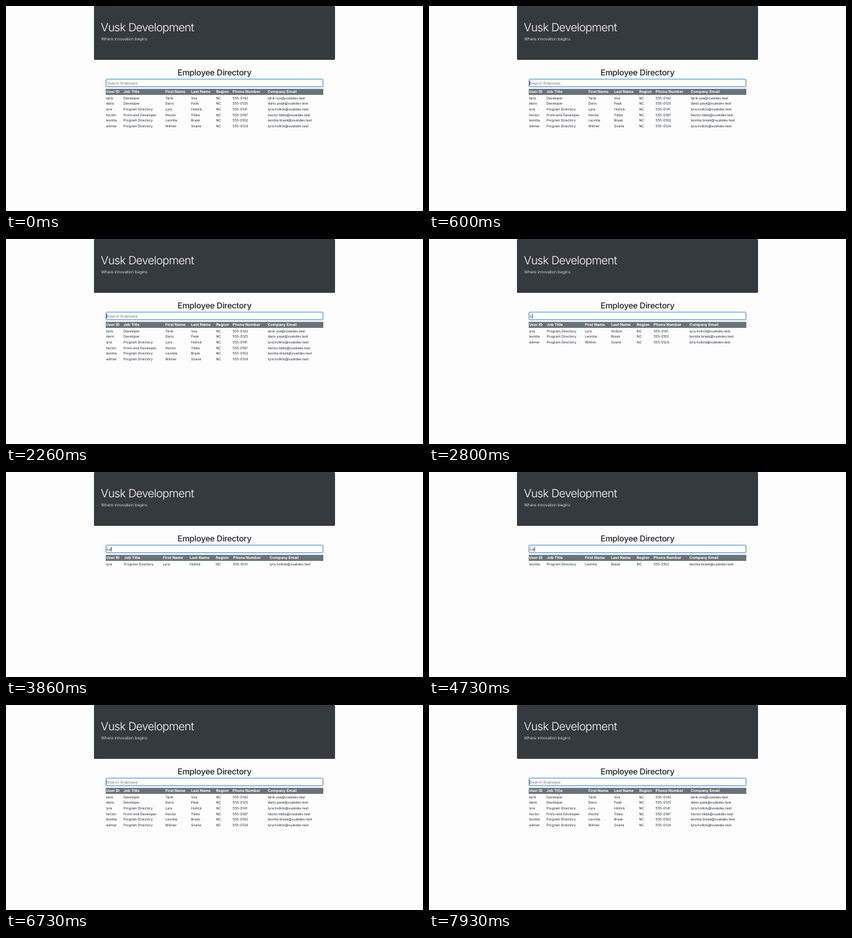
Animation, 640 px wide and 316 px high, one loop 8000 ms. Source, as an HTML page:

```html
<!DOCTYPE html>
<html lang="en">
<head>
<meta charset="utf-8">
<title>Employee Directory</title>
<style>
  html, body { margin: 0; width: 100%; height: 100%; overflow: hidden; background: #fdfdfd; }
  svg { display: block; width: 100%; height: 100%; }
  text {
    font-family: Inter, "Open Sans", sans-serif;
    font-optical-sizing: none;
    text-rendering: geometricPrecision;
    white-space: pre;
    fill: #212529;
  }
  .title { font-size: 17.4px; font-weight: 300; letter-spacing: -.034em; fill: #fff; }
  .lead { font-size: 6.3px; font-weight: 300; letter-spacing: -.012em; fill: #fff; }
  .heading { font-size: 12.6px; font-weight: 500; letter-spacing: -.02em; text-anchor: middle; }
  .search { font-size: 5.7px; }
  .hint { fill: #757575; }
  .head { font-size: 5.85px; font-weight: 700; fill: #fff; }
  .cell { font-size: 5.22px; }
</style>
</head>
<body>
<svg viewBox="0 0 640 316" xmlns="http://www.w3.org/2000/svg">
  <defs>
    <path id="beam" d="M-1.4-3.9Q0-3.9 0-2.9V2.9Q0 3.9-1.4 3.9M1.4-3.9Q0-3.9 0-2.9V2.9Q0 3.9 1.4 3.9"/>
  </defs>
  <rect width="640" height="316" fill="#fdfdfd"/>
  <rect x="135" width="370" height="83" rx="1.6" fill="#343a3e"/>
  <text class="title" x="145.6" y="39">Vusk Development</text>
  <text class="lead" x="146" y="53.3">Where innovation begins</text>
  <text class="heading" x="320" y="106.9">Employee Directory</text>
  <rect x="153.5" y="112.8" width="333" height="11.7" rx=".8" fill="#fff" stroke="#4288cc"/>
  <text class="search hint" id="hint" x="155" y="120.9">Search Employee</text>
  <text class="search" id="typed" x="155" y="120.9"></text>
  <rect id="caret" y="115.4" width=".8" height="7.2" fill="#1c1c1c"/>
  <rect x="153" y="127.7" width="334" height="9.3" fill="#69737a"/>
  <g id="table"></g>
  <g id="pointer" fill="none">
    <use href="#beam" stroke="#fff" stroke-width="1.3"/>
    <use href="#beam" stroke="#333" stroke-width=".5"/>
  </g>
</svg>
<script>
const LOOP = 8000;
const HALF_BLINK = 530;
const TABLE = { left: 153.2, width: 333.5, pad: .33, headY: 134.4, rowY: 143.5, pitch: 8.7 };
const $ = id => document.getElementById(id);
const clamp = v => Math.max(0, Math.min(1, v));

const heads = ['User ID', 'Job Title', 'First Name', 'Last Name', 'Region', 'Phone Number', 'Company Email'];

const person = (first, last, job, phone, mail = first + '.' + last) => [
  first.toLowerCase(), job, first, last, 'NC', '555-' + phone, mail.toLowerCase() + '@vuskdev.test'
];
const people = [
  person('Tarik', 'Voe', 'Developer', '0142'),
  person('Dario', 'Pask', 'Developer', '0125'),
  person('Lyra', 'Hollick', 'Program Directory', '0141'),
  person('Hector', 'Tibbs', 'Front-end Developer', '0197'),
  person('Leontia', 'Brask', 'Program Directory', '0102'),
  person('Wilmer', 'Soane', 'Program Directory', '0124', 'Lyra.Hollick')
];

// [time, query]; the first edit precedes the loop
const edits = [
  [-730, ''], [1000, 'D'], [2000, ''], [2800, 'L'], [3800, 'Ly'],
  [4330, 'L'], [4730, 'Le'], [5400, 'L'], [5670, '']
];

function addText(text, y, cls) {
  const el = document.createElementNS('http://www.w3.org/2000/svg', 'text');
  el.setAttribute('class', cls);
  el.setAttribute('y', y);
  el.textContent = text;
  $('table').append(el);
  return el;
}

// Columns share the table width in proportion to their widest text.
function layTable(rows) {
  $('table').replaceChildren();
  const columns = heads.map((head, c) => [
    addText(head, TABLE.headY, 'head'),
    ...rows.map((row, r) => addText(row[c], TABLE.rowY + r * TABLE.pitch, 'cell'))
  ]);
  const widths = columns.map(col =>
    Math.max(...col.map(el => el.getComputedTextLength())) + 2 * TABLE.pad);
  const scale = TABLE.width / widths.reduce((a, b) => a + b);
  let x = TABLE.left;
  columns.forEach((col, c) => {
    col.forEach(el => el.setAttribute('x', x + TABLE.pad));
    x += widths[c] * scale;
  });
}

let shown = null;
function showQuery(query) {
  if (query === shown) return;
  shown = query;
  $('typed').textContent = query;
  $('hint').style.display = query ? 'none' : '';
  layTable(people.filter(row => row[2].toLowerCase().includes(query.toLowerCase())));
}

// The caret is solid after each edit, then blinks with soft fades.
function showCaret(age) {
  const phase = Math.floor(age / HALF_BLINK);
  const p = age % HALF_BLINK;
  const fadeIn = phase ? clamp(.5 + p / 540) : 1;
  const fadeOut = clamp((HALF_BLINK - p) / 70);
  const width = shown ? $('typed').getComputedTextLength() : -.7;
  $('caret').setAttribute('x', 155.1 + width);
  $('caret').setAttribute('opacity', phase % 2 ? 0 : Math.min(fadeIn, fadeOut));
}

function showPointer(t) {
  const p = clamp((t - 6870) / 1000);
  const ease = p * p * (3 - 2 * p);
  $('pointer').style.display = p ? '' : 'none';
  $('pointer').setAttribute('transform', `translate(${206 - 6.6 * ease} ${119.6 + 14.3 * ease})`);
}

function draw(t) {
  const [time, query] = edits.findLast(edit => edit[0] <= t);
  showQuery(query);
  showCaret(t - time);
  showPointer(t);
}

const begin = performance.now();
function tick() {
  draw((performance.now() - begin) % LOOP);
  requestAnimationFrame(tick);
}
tick();
</script>
</body>
</html>
```
